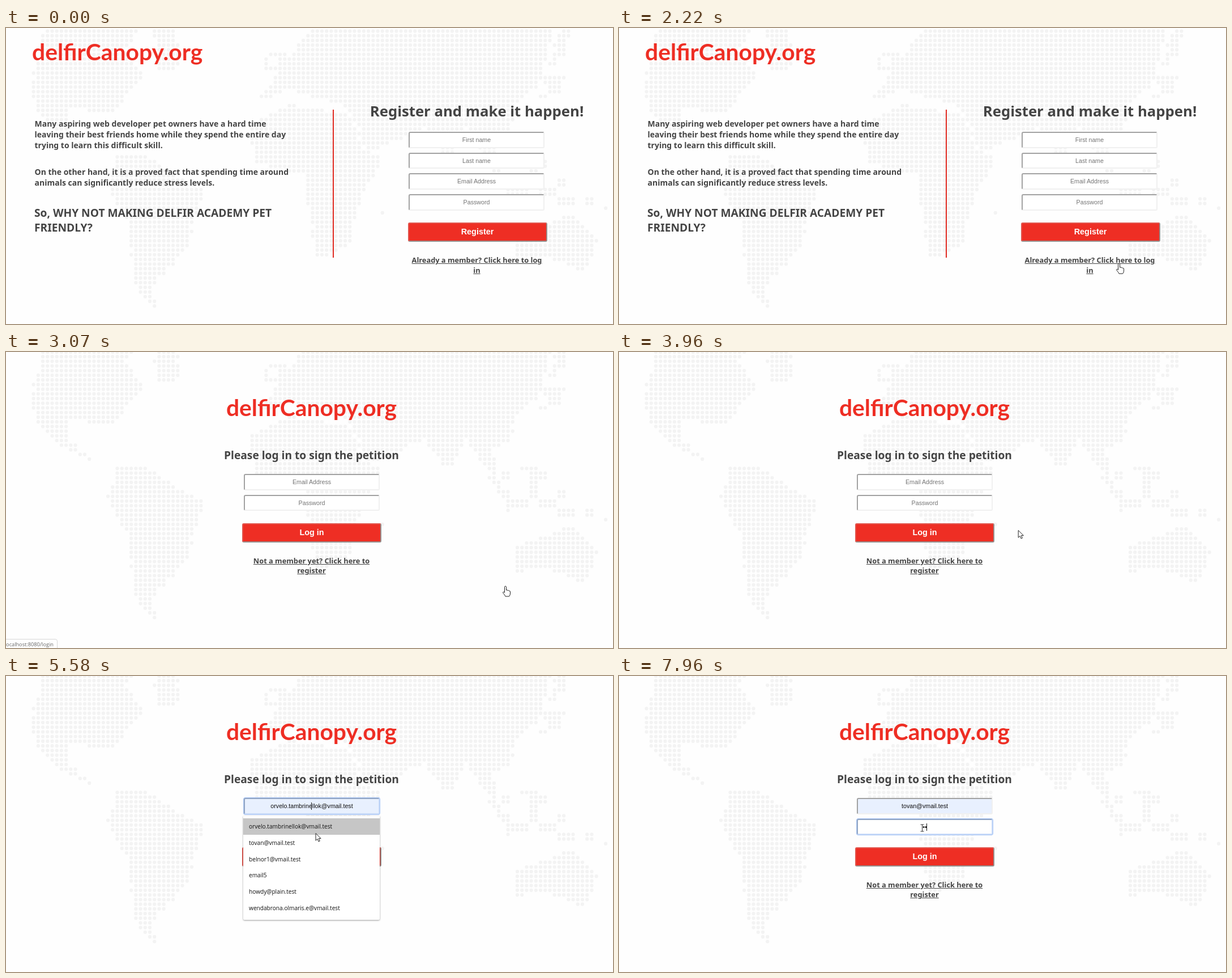
Recreate the animation shown at these times as an HTML page with a canvas. Size 1072 by 522 pixels, loop 8 s.

```html
<!DOCTYPE html>
<html lang="en">
<head>
<meta charset="utf-8">
<title>Petition sign-in</title>
<style>
  html, body { margin: 0; width: 100%; height: 100%; overflow: hidden; background: #fefefe; }
  #stage { position: relative; width: 1072px; height: 522px; overflow: hidden;
    font: 700 14px/19px "Noto Sans", sans-serif; color: #444; }
  #stage * { position: absolute; box-sizing: border-box; margin: 0; }
  #stage svg * { position: static; }
  .page { inset: 0; }
  p, h1, h2, a { white-space: pre; }
  h1 { font: 700 40.8px/48px Lato, sans-serif; color: #ee2e24; }
  .mid { left: 539.5px; transform: translateX(-50%); text-align: center; }
  #register .mid { left: 831.5px; }
  .big { font-size: 19.2px; line-height: 26px; }
  a { font-size: 12.8px; line-height: 17.4px; text-decoration: underline; }
  .field { left: 420px; width: 240px; height: 28.5px; border: 2px solid; border-color: #a2a2a2 #f0f0f0 #f0f0f0 #a2a2a2;
    border-radius: 3px; background: #fff; color: #757575; text-align: center;
    font: 10.667px/24.5px Arial, "Liberation Sans", sans-serif; }
  #register .field { left: 711px; }
  .field.filled { color: #111; }
  .field.auto { background: #e8f0fe; }
  .field.focus { border-color: #93a6c4 #c9dbf8 #c9dbf8 #93a6c4; box-shadow: 0 0 0 1px #a9c6f6; }
  .button { left: 417px; width: 246px; height: 34px; border: 2px solid; border-color: #e2564e #98908e #98908e #e2564e;
    border-radius: 3px; background: #ee2e24; color: #fff; text-align: center;
    font: 700 14.4px/29px Arial, "Liberation Sans", sans-serif; }
  #register .button { left: 709.5px; }
  .rule { left: 577px; top: 144px; width: 2px; height: 261px; background: #e02b22; }
  #caret { width: 1px; height: 13px; background: #111; }
  #menu { left: 419px; top: 247px; width: 241px; height: 183px; background: #fff;
    border-radius: 0 0 2px 2px; box-shadow: 0 1px 3px #0006; }
  #menu div { left: 0; width: 241px; height: 28.8px; padding-left: 10px; color: #111;
    font: 400 10.15px/28.8px "Open Sans", sans-serif; }
  #menu .hover { background: #c6c6c6; }
  #status { left: -5px; top: 506px; width: 95.5px; height: 20px; padding-right: 5.5px; border: 1px solid #d6d6d6;
    border-radius: 0 4px 0 0; background: #fff; color: #666; white-space: pre;
    direction: rtl; font: 400 9.2px/18px "Open Sans", sans-serif; }
  #cursors { left: 0; top: 0; overflow: visible; }
</style>
</head>
<body>
<div id="stage">
  <canvas id="map" width="1072" height="546"></canvas>

  <div class="page" id="register">
    <h1 style="left:46px;top:18px">delfirCanopy.org</h1>
    <p style="left:50.5px;top:159px">Many aspiring web developer pet owners have a hard time
leaving their best friends home while they spend the entire day
trying to learn this difficult skill.</p>
    <p style="left:50.5px;top:244px">On the other hand, it is a proved fact that spending time around
animals can significantly reduce stress levels.</p>
    <p class="big" style="left:50px;top:312.5px">So, WHY NOT MAKING DELFIR ACADEMY PET
FRIENDLY?</p>
    <div class="rule"></div>
    <h2 class="mid" style="top:128.5px;font-size:25.7px;line-height:35px">Register and make it happen!</h2>
    <div class="field" style="top:183px">First name</div>
    <div class="field" style="top:219.7px">Last name</div>
    <div class="field" style="top:256.3px">Email Address</div>
    <div class="field" style="top:293px">Password</div>
    <div class="button" style="top:343px">Register</div>
    <a class="mid" style="top:401.3px">Already a member? Click here to log
in</a>
  </div>

  <div class="page" id="login">
    <h1 class="mid" style="top:74px">delfirCanopy.org</h1>
    <h2 class="mid big" style="top:169px">Please log in to sign the petition</h2>
    <div class="field" id="email" style="top:215px"></div>
    <div class="field" id="password" style="top:251.7px"></div>
    <div class="button" style="top:302px">Log in</div>
    <a class="mid" style="top:360px">Not a member yet? Click here to
register</a>
    <div id="menu"></div>
    <div id="caret"></div>
  </div>

  <div id="status">localhost:8080/login</div>

  <svg id="cursors" width="1072" height="522">
    <g id="cursor" stroke-linejoin="round">
      <circle id="click" cx="-1" cy="-.5" r="9.3" fill="#fbf52c" fill-opacity=".75"/>
      <path id="arrow" d="M.5.5V13.2l3-2.8 2 4.6 2.2-1-2-4.4h4z" fill="#fff" stroke="#222"/>
      <path id="hand" d="M-1.5 1.5a1.5 1.5 0 0 1 3 0V7q1.6-.9 2.6.5 1.6-.6 2.5.7 1.9-.3 1.9 1.8V13q0 3-2 5H0q-1-2.5-4.5-6.5 0-2 2-1.2l1 1z" fill="#fff" stroke="#222"/>
      <path id="beam" d="M-3-6H3M0-6V6M-3 6H3" fill="none" stroke="#333"/>
    </g>
  </svg>
</div>

<script>
const $ = id => document.getElementById(id);
const show = (id, on) => { $(id).style.display = on ? '' : 'none'; };
const between = (v, from, to) => v >= from && v < to;

// Rough outlines; the dot grid and a seeded jitter give the ragged coasts.
const americas = new Path2D('M66-22H232L212 20 244 62 190 126 116 122 106 152 168 204 90 162 46 108 50 66ZM260-22H304V52H270Z' +
  'M196 200H240L348 266 318 368 254 436 268 474 232 446 216 318 178 262Z');
const oldWorld = new Path2D('M536-22H966L940 80 906 104 888 156 858 170 872 240 814 152 784 210 740 152 642 198 604 118 500 88 448 106 470 70Z' +
  'M428 148L500 112 604 130 640 204H668L630 270 604 362 550 388 524 236 440 216Z');
const australia = new Path2D('M900 342L1000 306 1048 354 1020 408 950 378 900 390Z');
const islands = new Path2D('M850 214L950 200 1060 296 890 284ZM980-22H1000L980 100 940 106ZM456 24H496V54H456ZM652 312L668 300 658 346Z');

function random(seed) {
  const v = Math.sin(seed * 12.9898) * 43758.5453;
  return v - Math.floor(v);
}

function drawMap() {
  const ctx = $('map').getContext('2d');
  const pitch = 8.215, left = 7.55, top = -16.5;
  ctx.fillStyle = '#f3f3f3';
  for (let row = 0; row < 64; row++)
    for (let col = 0; col < 130; col++) {
      const x = left + col * pitch, y = top + row * pitch, noise = random(row * 130 + col);
      const inside = shape => ctx.isPointInPath(shape, x + (noise - 0.5) * 6, y);
      const patch = random((row >> 1) * 65 + (col >> 1));
      if ([americas, oldWorld, australia].some(inside) || (patch < 0.5 && inside(islands))) {
        ctx.beginPath();
        ctx.arc(x, y + 22, 3.1, 0, 7);
        ctx.fill();
      }
    }
}

const LOOP = 8000, LOGIN = 3070, FOCUS = 4890, OPEN = 4960, PICK = 6390, NEXT = 7200;
const STEP = 77, ROW = 28.8;
const emails = ['orvelo.tambrinellok@vmail.test', 'tovan@vmail.test', 'belnor1@vmail.test',
  'email5', 'howdy@plain.test', 'wendabrona.olmaris.e@vmail.test'];
const rows = emails.map((text, i) => {
  const row = document.createElement('div');
  row.textContent = text;
  row.style.top = 4 + i * ROW + 'px';
  return $('menu').appendChild(row);
});

// Pointer stops, each reached in eased steps.
const moves = [
  { start: 600, end: 750, to: [990, 519] },
  { start: 920, end: 1680, to: [902, 454] },
  { start: 1760, end: 2300, to: [882, 413] },
  { start: 3650, end: 4420, to: [572, 240] },
  { start: 4500, end: 4580, to: [572, 234.5] },
  { start: 5340, end: 5580, to: [546.5, 277] },
  { start: 5660, end: 6130, to: [542, 291] },
  { start: 6710, end: 6860, to: [535.5, 268] }
];

function pointer(t) {
  let x = 990, y = 532;
  for (const { start, end, to } of moves) {
    if (t < start) break;
    const steps = Math.round((end - start) / STEP) + 1;
    const step = Math.min(steps, Math.floor((t - start + 4) / (end - start) * (steps - 1)) + 1);
    const p = 1 - (1 - step / steps) ** 1.4;
    x += (to[0] - x) * p;
    y += (to[1] - y) * p;
  }
  return { x, y };
}

const fade = (t, start) => Math.max(0, Math.min(3, Math.floor((t - start) / 75) + 1)) / 3;

function setField(id, value, placeholder, focus, auto) {
  $(id).textContent = value || placeholder;
  $(id).className = 'field' + (value ? ' filled' : '') + (focus ? ' focus' : '') + (auto ? ' auto' : '');
}

function render(t) {
  const { x, y } = pointer(t);
  const login = t >= LOGIN, open = between(t, OPEN, PICK);
  const hovered = open && y > 251 ? Math.floor((y - 251) / ROW) : -1;
  const value = t >= PICK ? emails[1] : emails[hovered] || '';
  const typed = t >= 7960 ? 2 : t >= 7890 ? 1 : 0;

  show('register', !login);
  show('login', login);
  $('map').style.top = (login ? -22 : -0.5) + 'px';
  setField('email', value, 'Email Address', between(t, FOCUS, NEXT), value);
  setField('password', '•'.repeat(typed), 'Password', t >= NEXT);
  show('menu', open);
  rows.forEach((row, i) => row.classList.toggle('hover', i === hovered));

  show('caret', t >= FOCUS && !between(t, 7030, NEXT) && !between(t, 7740, 7890));
  $('caret').style.left = (between(t, PICK, NEXT) ? 580 : 539 + typed * 2) + 'px';
  $('caret').style.top = (t < NEXT ? 223 : 260) + 'px';

  $('status').style.opacity = fade(t, 2450) - fade(t, 3310);

  const onLink = t < 3650 && y < 419;
  const onField = login && !open && Math.abs(x - 540) < 120 && (between(y, 215, 244) || between(y, 252, 280));
  show('hand', onLink);
  show('beam', onField);
  show('arrow', !onLink && !onField);
  show('click', between(t, 2770, 2860) || between(t, FOCUS, OPEN) || between(t, NEXT, 7260));
  $('cursor').setAttribute('transform', `translate(${x} ${y})`);
}

drawMap();
const begin = performance.now();
function tick() {
  render((performance.now() - begin) % LOOP);
  requestAnimationFrame(tick);
}
tick();
</script>
</body>
</html>
```
